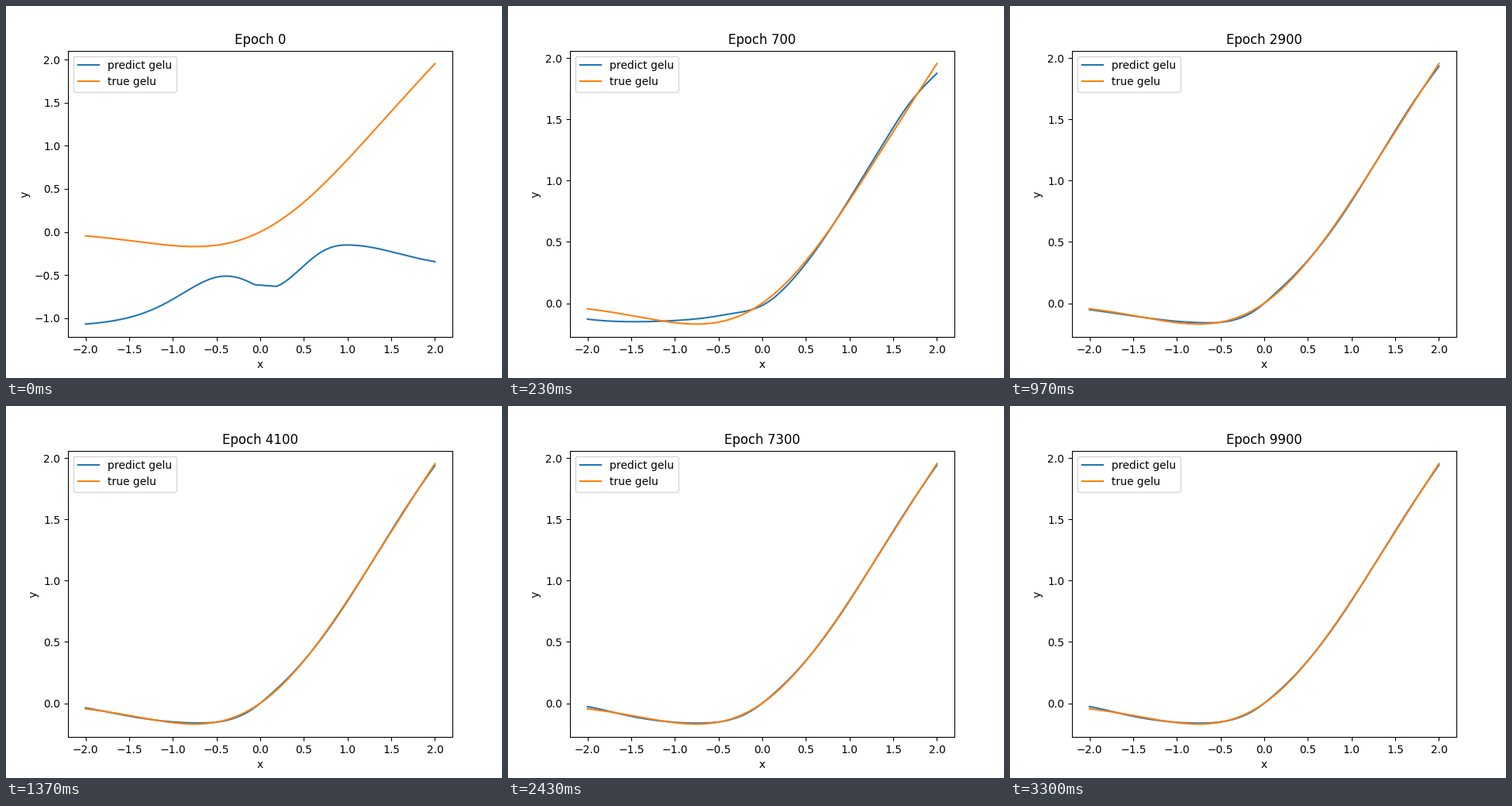
A matplotlib script that plays this animation: 640x480 px, repeating every 3.33 s.

```python
import math

import matplotlib.pyplot as plt
import numpy as np
from matplotlib.animation import FuncAnimation

LOOP_MS = 3330
TICK_MS = 10  # pictures last 30, 40, 30 ms, so the clock ticks every 10 ms
EPOCHS_PER_PICTURE = 100


def gelu(x):
    return np.array([t * 0.5 * (1 + math.erf(t / math.sqrt(2))) for t in x])


def ease_through(peaks, x):
    """Cosine easing from each (x, y) peak to the next."""
    px, py = np.array(peaks).T
    pos = np.interp(x, px, np.arange(len(px)))
    i = np.minimum(pos.astype(int), len(px) - 2)
    u = (1 - np.cos(np.pi * (pos - i))) / 2
    return py[i] + u * (py[i + 1] - py[i])


def untrained(x):
    """A bump, a short plateau and a hill with a slow right slope."""
    bump = -1.1 + 0.587 / np.cosh(1.35 * (x + 0.39))**2
    plateau = -0.618 - 0.08 * x
    d = np.abs(x - 1)
    rise = 0.5 * np.sin(1.76 * d**1.2)**2
    fall = 0.29 * np.tanh(1.15 * d)**2
    hill = -0.152 - np.where(x < 1, rise, fall)
    return np.select([x < -0.06, x < 0.178], [bump, plateau], hill)


x = np.linspace(-2, 2, 200)
truth = gelu(x)
start = untrained(x)

# Errors of the fit: broad at first, then a finer ripple and a lifted left end
broad = ease_through([(-2, -0.084), (-0.5, 0.052), (0.17, -0.03),
                      (1.55, 0.035), (2.45, -0.19)], x)
ripple = ease_through([(-2, -1), (-0.85, 1), (-0.2, -1.1), (0.2, 1),
                       (0.9, -0.8), (1.6, 0.75), (2.4, -4)], x)
lift = np.exp(-1.5 * (x + 2)) * np.cos(4 * (x + 2))


def predict(epoch):
    size = 0.007 + 0.013 * math.exp(-(epoch - 1900) / 1300)
    raised = 0.025 / (1 + math.exp(-(epoch - 3600) / 700))
    fine = size * ripple + raised * lift
    early = math.exp(-max(epoch - 700, 0) / 350)
    fit = truth + fine + early * (broad - fine)
    return fit + (start - truth - broad) * math.exp(-epoch / 92)


fig, ax = plt.subplots(figsize=(6.4, 4.8), dpi=100)
guess, = ax.plot(x, start, label="predict gelu")
ax.plot(x, truth, label="true gelu")
title = ax.set_title("Epoch 0")
ax.set_xlabel("x")
ax.set_ylabel("y")
ax.legend(loc="upper left")


def draw(tick):
    picture = (3 * tick + 1) // 10
    epoch = picture * EPOCHS_PER_PICTURE
    guess.set_ydata(predict(epoch))
    title.set_text(f"Epoch {epoch}")
    ax.relim()
    ax.autoscale_view()


anim = FuncAnimation(fig, draw, frames=LOOP_MS // TICK_MS,
                     init_func=lambda: None, interval=TICK_MS,
                     repeat=True, repeat_delay=0)
plt.show()
```
